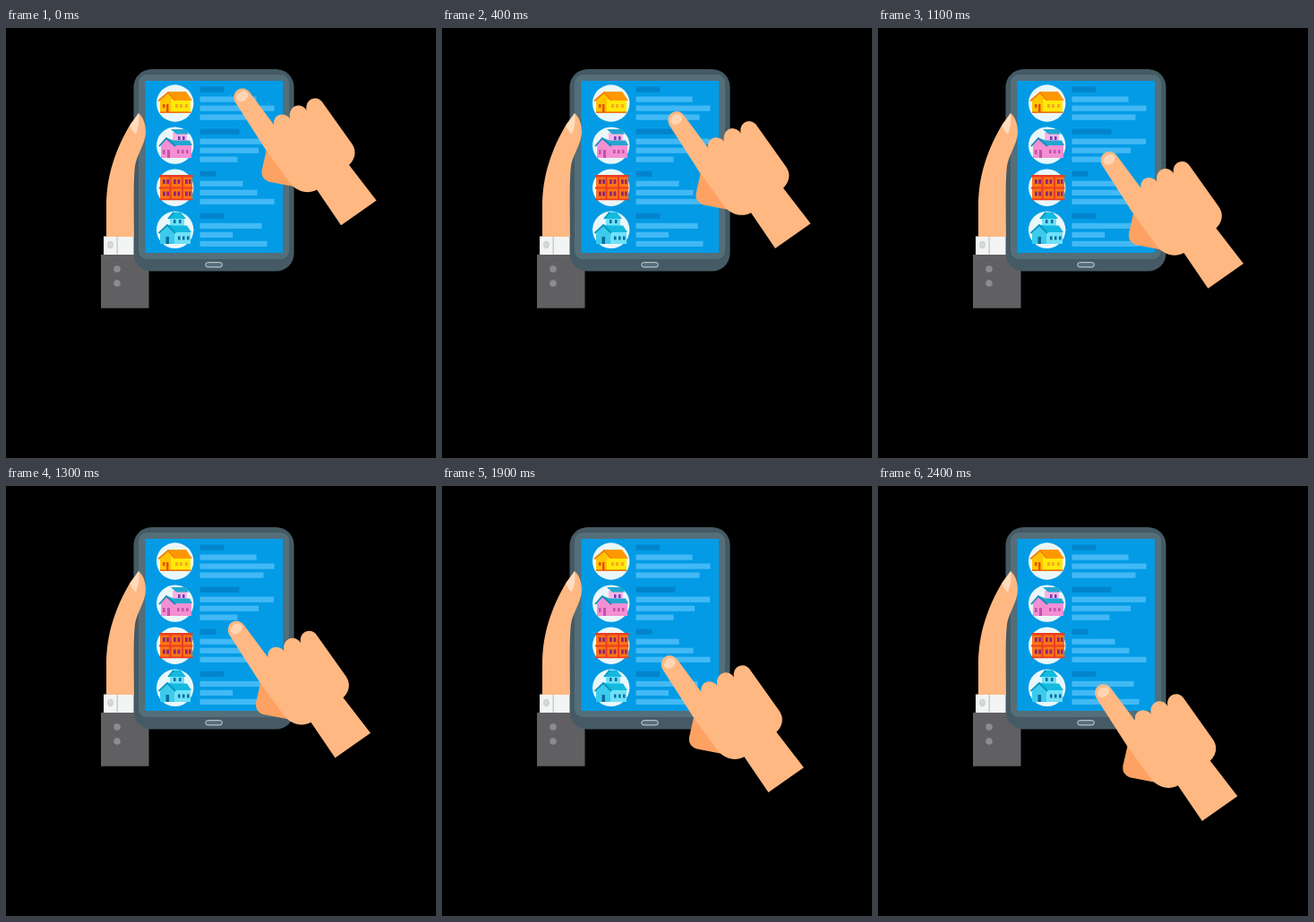
Write an HTML page that moves like this. It is 480x480 px and loops after 8000 ms.

```html
<!DOCTYPE html>
<html lang="en">
<head>
<meta charset="utf-8">
<title>Browsing houses on a tablet</title>
<style>
  html, body { margin: 0; width: 100%; height: 100%; overflow: hidden; background: #000; }
  svg { display: block; width: 100%; height: 100%; }
</style>
</head>
<body>
<svg viewBox="0 0 480 480">
  <!-- sleeve and cuff -->
  <path fill="#606062" d="M106 253h53.500v59.700h-53.500z"/>
  <g fill="#8c8c8e"><circle cx="124" cy="269" r="3.800"/><circle cx="124" cy="285" r="3.800"/></g>
  <path fill="#f3f5f5" d="M109 232.500h36v20.500h-36z"/>
  <path fill="#c9cdce" d="M123.500 232.500h1.500v20.500h-1.500z"/>
  <ellipse cx="116.500" cy="242" rx="3" ry="4" fill="#d5d8d8" stroke="#bfc4c5" stroke-width=".6"/>

  <!-- tablet -->
  <rect x="142.500" y="46" width="179" height="225.500" rx="20" fill="#455a64"/>
  <rect x="148" y="52" width="168" height="206" rx="9" fill="#546e7a"/>
  <path fill="#039be5" d="M155.500 59h153.500v192h-153.500z"/>
  <rect x="222.800" y="261.700" width="18.500" height="5.200" rx="2.500" fill="#546e7a" stroke="#cfd8dc"/>
  <g id="rows"></g>

  <!-- yellow house -->
  <path fill="#ffc400" d="M172 81l9-9 8 9v13.500h-17z"/>
  <path fill="#ffe80a" d="M184 80h22v14.500h-22z"/>
  <path fill="#ff9800" d="M181 71h20l7 10h-18z"/>
  <path fill="none" stroke="#f57c00" stroke-width="1.800" d="M170 81.500l11-9.500 8 9"/>
  <path fill="#e65100" d="M175 85h2.500v4h-2.500zM179 85h2.500v9.500h-2.500zM172 93.500h34v1.200h-34z"/>
  <path fill="#f9a825" d="M189 85h3v4h-3zM194 85h3v4h-3zM200 85h3v4h-3z"/>

  <!-- pink house -->
  <path fill="#ffb3e3" d="M186 117h16v28h-16z"/>
  <path fill="#f48fd3" d="M173 131l6-8 9 8v14h-15zM187 131h20v14h-20z"/>
  <path fill="#22a7d0" d="M184 113h17l3 5.500h-14zM179 122.500l8 3h18l3 5.500h-20z"/>
  <path fill="none" stroke="#168bbd" stroke-width="1.800" d="M171 132l8-9 10 9"/>
  <path fill="#6a3fb5" d="M192 121h2.500v4h-2.500zM197 121h2.500v4h-2.500z"/>
  <path fill="#c154a8" d="M175 136h2.500v5h-2.500zM180 136h3v9h-3zM191 136h2.500v4h-2.500zM196 136h2.500v4h-2.500zM201 136h2.500v4h-2.500z"/>

  <!-- orange house -->
  <path fill="#ff7417" d="M172 165h36v27h-36z"/>
  <path fill="#e93e20" d="M171 164h37.500v2.500h-37.500zM171 177.500h37.500v2h-37.500zM171 190.500h37.500v1.700h-37.500zM182.500 166h2v25h-2zM196 166h2v25h-2z"/>
  <path fill="#8e2870" d="M175 169h2.800v5h-2.800zM179.200 169h2.800v5h-2.800zM187 169h2.800v5h-2.800zM191.500 169h2.800v5h-2.800zM200 169h2.800v5h-2.800zM204 169h2.500v5h-2.500zM175 182.500h2.800v5h-2.800zM179.200 182.500h2.800v5h-2.800zM187 182.500h2.800v5h-2.800zM191.500 182.500h2.800v5h-2.800zM200 182.500h2.800v5h-2.800zM204 182.500h2.500v5h-2.500z"/>

  <!-- cyan house -->
  <path fill="#70e1f7" d="M183 211h16v14h-16zM186 226h20v15h-20z"/>
  <path fill="#3ccbed" d="M172 229l8-9 8 9v12h-16z"/>
  <path fill="#13b9df" d="M186 205.500h9l6 7.500h-20zM180 219.500l7 1h15l5 7.500h-19z"/>
  <path fill="none" stroke="#0796bf" stroke-width="1.800" d="M170.500 229l9.500-9 9 9M181 213l6-7"/>
  <path fill="#086d9f" d="M187 214h2.500v4h-2.500zM193 214h2.500v4h-2.500zM178.500 233h3.500v8h-3.500zM192 232.500h2.500v4h-2.500zM197 232.500h2.500v4h-2.500zM202 232.500h2.500v4h-2.500z"/>

  <!-- holding arm -->
  <path fill="#ffb882" d="M112 233V199C112 165 122 136 139 107L148 95C153 99 156 107 156 116C156 129 146 141 144 154C142 170 143 200 143 233z"/>
  <path fill="#ffdcbf" d="M148 95L138.500 109Q141 116 145 118Q150 107 148 95z"/>

  <!-- pointing hand -->
  <g id="hand">
    <path fill="#fda262" d="M291 135L285.500 159Q284.500 168 293 171.500L324 177.500z"/>
    <path fill="#ffb882" d="M256 83C252 76 256 68 263 67.500Q269 67 273 73L299 108C298 99 305 95 311 97Q315 98 317 101C315 92 321 86 327 86.500Q333 87 335.500 92C334 84 339 78 346 78.500Q351 79 354 84L386 129C391 136 391 145 383 153L413.500 192.500L374 220.300L347 180.500C337 186 325 183 317 173L290 136z"/>
    <ellipse cx="263.800" cy="76.200" rx="7" ry="5.400" transform="rotate(-34 263.800 76.200)" fill="#ffd5b4"/>
  </g>
</svg>
<script>
const LOOP = 8000, STEP = 100, TRAVEL = 2400;
const hand = document.getElementById('hand');

// Each listing: heading width followed by its three text line widths.
const listings = [
  [26.5, 63, 83, 71],
  [44, 82.5, 65.5, 42],
  [18, 48, 64, 83],
  [26.5, 69, 36.5, 75]
];
document.getElementById('rows').innerHTML = listings.map((widths, row) => {
  const top = 65.5 + row * 47.1;
  const bars = widths.map((width, i) => {
    const y = top + (i ? 1 + i * 10 : 0);
    return `<rect x="216.500" y="${y}" width="${width}" height="6.200" fill="${i ? '#42b9f5' : '#0284cc'}"/>`;
  }).join('');
  return `<circle cx="188.700" cy="${top + 18.5}" r="20.700" fill="#eaf7fa"/>${bars}`;
}).join('');

function draw(now) {
  const time = Math.floor(now % LOOP / STEP) * STEP;
  const progress = Math.min(time / TRAVEL, 1);
  hand.setAttribute('transform', `translate(${-12.2 * progress} ${153.8 * progress})`);
}

const start = performance.now();
function tick() {
  draw(performance.now() - start);
  requestAnimationFrame(tick);
}
tick();
</script>
</body>
</html>
```
